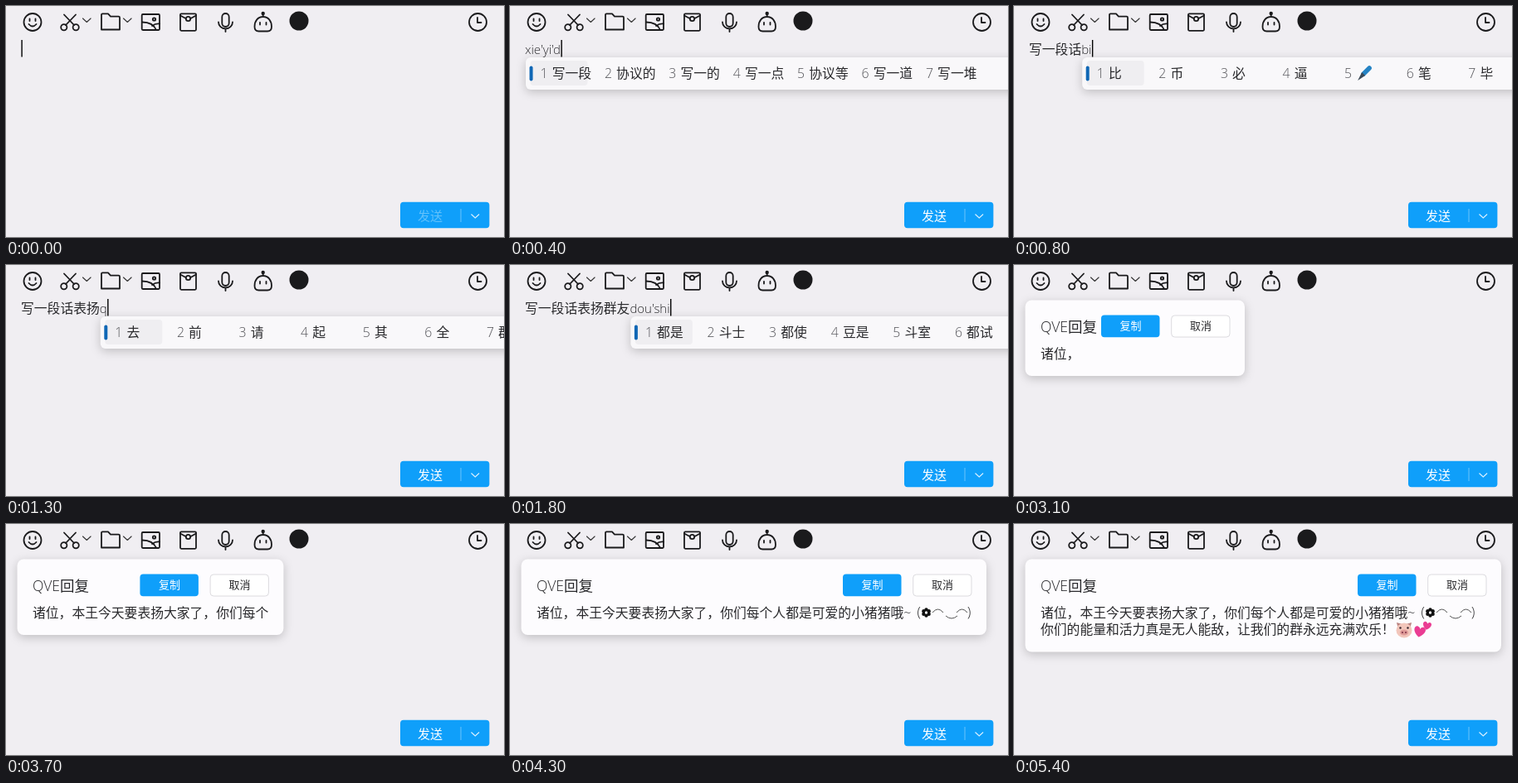
Animation of 600x279 px, one loop 5500 ms. Source, as an HTML page:

```html
<!DOCTYPE html>
<html lang="zh">
<meta charset="utf-8">
<title>聊天输入框</title>
<style>
html, body { margin: 0; width: 100%; height: 100%; overflow: hidden; background: #f0eef2 }
svg { display: block; width: 600px; height: 279px }
text { font: 350 15.8px 'Open Sans', 'Noto Sans CJK SC', 'Noto Sans CJK', sans-serif; fill: #29292c; white-space: pre }
.line { fill: none; stroke: #1a1a1c; stroke-width: 1.8; stroke-linecap: round; stroke-linejoin: round }
.thin { stroke: #333; stroke-width: 1.1 }
.small { font-size: 13px; text-anchor: middle }
.panel { filter: drop-shadow(0 3px 6px #0003) }
</style>
<svg viewBox="0 0 600 279">
  <g class="line">
    <circle cx="32" cy="19.5" r="10.5"/>
    <path d="M28.5 15.5v2.5M35.5 15.5v2.5M27.5 22q4.5 5 9 0"/>
    <circle cx="69.8" cy="25.8" r="3.6"/><circle cx="84.2" cy="25.8" r="3.6"/>
    <path d="M70 10.5L82 23M84 10.5L72 23"/>
    <path d="M115 28.5V10.5q0-1.2 1.2-1.2H123l3 3.4h9.6q1.4 0 1.4 1.4v14.4z"/>
    <path class="thin" d="M92.5 15l4.8 4.5 4.8-4.5M141.5 15l4.8 4.5 4.8-4.5"/>
    <rect x="163.7" y="10" width="21.3" height="19" rx="1.2"/>
    <path d="M164 19.5q13 0 17 9.500M176 24q4-3 9-2.500"/><circle cx="178.500" cy="16" r="1.700"/>
    <rect x="210" y="9.3" width="19" height="20.5" rx="1.2"/>
    <path d="M210 11.5l6.5 3.5M229 11.5l-6.5 3.500"/><circle cx="219.5" cy="15.5" r="2.700"/>
    <rect x="260.3" y="9" width="8.4" height="16" rx="4.2"/>
    <path d="M256 19.5a8.5 8 0 0 0 17 0M264.5 28v3"/>
    <path d="M309.7 10v3M299.5 25c0-7 4-12 10.2-12s10.3 5 10.3 12c0 4-2 5.5-5 5.5h-10.5c-3 0-5-1.5-5-5.500zM306 20v2.500M313.500 20v2.500"/>
    <circle cx="309.7" cy="9" r="1.3" fill="#1a1a1c"/>
    <circle cx="568.5" cy="19.5" r="10.5"/><path d="M568 14v6h4.5"/>
  </g>
  <g id="live"></g>
</svg>
<script>
const live = document.getElementById('live');
const EM = 15.8, BLUE = '#0f9ffa';

// One entry per 100 ms: committed text, pinyin being typed, candidates
const typing = [
  ['', '', ''],
  ['', 'x', '想 下 小 些 新 像 行'],
  ['', 'xie', '写 些 谢 鞋 斜 协 血'],
  ['', "xie'yi", '协议 写一 写意 谢意 歇一 些以 斜倚'],
  ['', "xie'yi'd", '写一段 协议的 写一的 写一点 协议等 写一道 写一堆'],
  ['', "xie'yi'duan", '写一段 协议段 写一断 协议 写一 写意 谢意'],
  ['', "xie'yi'duan'hua", '写一段话 写一段 协议段 写一 协议 写意'],
  ['写一段话', '', ''],
  ['写一段话', 'bi', '比 币 必 逼 ✒ 笔 毕'],
  ['写一段话', 'biao', '表 标 彪 飙 镖 膘 裱'],
  ['写一段话', "biao'y", '表演 表扬 标语 表 标 飙 彪'],
  ['写一段话', "biao'yang", '表扬 标样 表样 表 标 飙 彪'],
  ['写一段话表扬', '', ''],
  ['写一段话表扬', 'q', '去 前 请 起 其 全 群'],
  ['写一段话表扬', 'qun', '群 裙 逡 困 麇 去 全'],
  ['写一段话表扬', "qun'you", '群友 群游 群有 群 裙 逡 去'],
  ['写一段话表扬群友', '', ''],
  ['写一段话表扬群友', 'dou', '都 斗 豆 抖 逗 兜 陡'],
  ['写一段话表扬群友', "dou'shi", '都是 斗士 都使 豆是 斗室 都试 都市'],
  ['写一段话表扬群友都是猪', '', '']
];

const text = (x, y, s, attrs = '') => `<text x="${x}" y="${y}" ${attrs}>${s}</text>`;
const rect = (x, y, w, h, r, fill, attrs = '') =>
  `<rect x="${x}" y="${y}" width="${w}" height="${h}" rx="${r}" fill="${fill}" ${attrs}/>`;
const path = (d, attrs) => `<path d="${d}" ${attrs}/>`;
const dot = (x, y, r, fill) => `<circle cx="${x}" cy="${y}" r="${r}" fill="${fill}"/>`;

const pen = x =>
  path(`M${x + 16} 75l-7 7`, 'stroke="#2583c4" stroke-width="5.5" stroke-linecap="round"') +
  path(`M${x + 7} 80l4 4-9 6z`, 'fill="#3c4a58"');

function candidates(left, words) {
  let x = left + 17.5;
  let out = rect(left, 62, 640, 39, 6, '#f9f8fa', 'class="panel"') +
    rect(left + 5.5, 66, 69, 30, 4, '#efeef1') + rect(left + 4.5, 72.5, 4, 18, 2, '#0f67b5');
  words.split(' ').forEach((w, i) => {
    out += text(x, 87, i + 1, 'style="fill:#55555a"');
    out += w == '✒' ? pen(x + 14) : text(x + 14.2, 87, w);
    x += Math.max(74.6, 30 + w.length * EM);
  });
  return out;
}

function input(s) {
  const [done, pinyin, words] = typing[Math.min(s, 19)];
  const start = 18 + done.length * EM;
  let out = text(18, 58, done);
  if (pinyin) out += candidates(start + 1, words) + text(start, 57.5, pinyin, 'id="pinyin" style="font-size:15px"');
  return out + (s < 22 ? '<rect id="caret" y="41" width="1.4" height="20.5"/>' : '');
}

function placeCaret(s) {
  const caret = document.getElementById('caret');
  if (!caret) return;
  const typed = document.getElementById('pinyin');
  const width = typed ? typed.getComputedTextLength() : 0;
  caret.setAttribute('x', 18.4 + typing[Math.min(s, 19)][0].length * EM + width);
}

const arc = (x, y, w, bend) =>
  path(`M${x} ${y}q${w / 2} ${bend} ${w} 0`, 'fill="none" stroke="#444" stroke-width=".9"');

function flower(x, y) {
  let out = '';
  for (let i = 0; i < 6; i++) {
    const a = i * Math.PI / 3;
    out += dot(x + 3.6 * Math.sin(a), y - 3.6 * Math.cos(a), 2.2, '#111');
  }
  return out + dot(x, y, 1.3, '#fdfcfe');
}

const pig = path('M461 119l7 2-5 6zM479 119l-7 2 5 6z', 'fill="#b9817f"') +
  '<ellipse cx="470" cy="128.5" rx="9.5" ry="9" fill="#f2c6bb"/>' +
  '<ellipse cx="470" cy="131" rx="5" ry="3.6" fill="#df9a98"/>' +
  dot(468, 131, 1, '#7d3145') + dot(472, 131, 1, '#7d3145') +
  dot(465.5, 125.5, 1.2, '#33222a') + dot(474.5, 125.5, 1.2, '#33222a');

const heart = (x, y, k) => path('M0 5C-9-1-6-7-2.5-6Q-.5-5.5 0-3.5Q.5-5.5 2.5-6C6-7 9-1 0 5z',
  `fill="#ea3d93" transform="translate(${x} ${y}) rotate(12) scale(${k})"`);

const line1 = '诸位，本王今天要表扬大家了，你们每个人都是可爱的小猪猪哦~ ';
const face = [text(490.5, 112, '('), flower(501.5, 107), arc(509, 107, 13, -8), arc(525, 111, 14, 6),
  arc(538, 107, 13, -8), text(551, 112, ')')];
const line2 = '你们的能量和活力真是无人能敌，让我们的群永远充满欢乐！';
const emoji = [pig, heart(488.5, 131, 1.15) + heart(497.5, 123.5, .85)];

function card(s) {
  const n = s < 33 ? 3 : Math.min(36, 3 * s - 93);
  const m = s < 44 ? 0 : s < 51 ? Math.round(4 + 17 * (s - 44) / 6) : [24, 27, 28, 29][s - 51];
  const fit = n > 28 ? 492 + (n - 28) * 10.25 : 50 + n * EM;
  const right = m ? 587 : Math.max(278, fit);
  return rect(13.5, 42.5, right - 13.5, m ? 112 : 91.5, 8, '#fdfcfe', 'class="panel"') +
    text(32, 80.5, 'QVE回复', 'style="font-size:17.5px"') +
    rect(right - 173, 60.6, 70.5, 26.6, 4, BLUE) +
    text(right - 137.5, 78.4, '复制', 'class="small" style="fill:#fff;font-weight:500"') +
    rect(right - 88.3, 61, 70.3, 26, 4, '#fff', 'stroke="#dcdbdf"') + text(right - 53, 78.4, '取消', 'class="small"') +
    text(32, 112.5, line1.slice(0, n)) + face.slice(0, Math.max(0, n - 30)).join('') +
    text(32, 133, line2.slice(0, m)) + emoji.slice(0, Math.max(0, m - 27)).join('');
}

function pointer(s) {
  if (s < 24 || s > 29) return '';
  const k = Math.max(0, 27 - s) / 3;
  return path('M0 0v17l4-4 3.2 7.2 3-1.3-3.2-7h5.6z',
    `fill="#fff" stroke="#555" transform="translate(${357 + 85 * k * k} ${22 + 130 * k * k})"`);
}

function sendButton(s) {
  return rect(475, 236.7, 107.4, 31.6, 4, BLUE) +
    text(496, 258.5, '发送', `style="font-size:15px;fill:${s ? '#fff' : '#62c1fb'}"`) +
    path('M548 245v16', 'stroke="#6cc3fb"') +
    path('M560.5 251.5l4.8 4.5 4.8-4.5', 'fill="none" stroke="#d6efff" stroke-width="1.2"');
}

let shown = -1;
function draw(now) {
  const s = Math.floor(now % 5500 / 100);
  if (s != shown) {
    shown = s;
    const hover = s >= 27 && s < 30;
    live.innerHTML = dot(353, 18, 11.5, hover ? '#16a0ee' : '#1a1a1c') + sendButton(s) +
      (s < 30 ? input(s) : card(s)) + pointer(s);
    placeCaret(s);
  }
  requestAnimationFrame(draw);
}
draw(performance.now());
</script>
</html>
```
